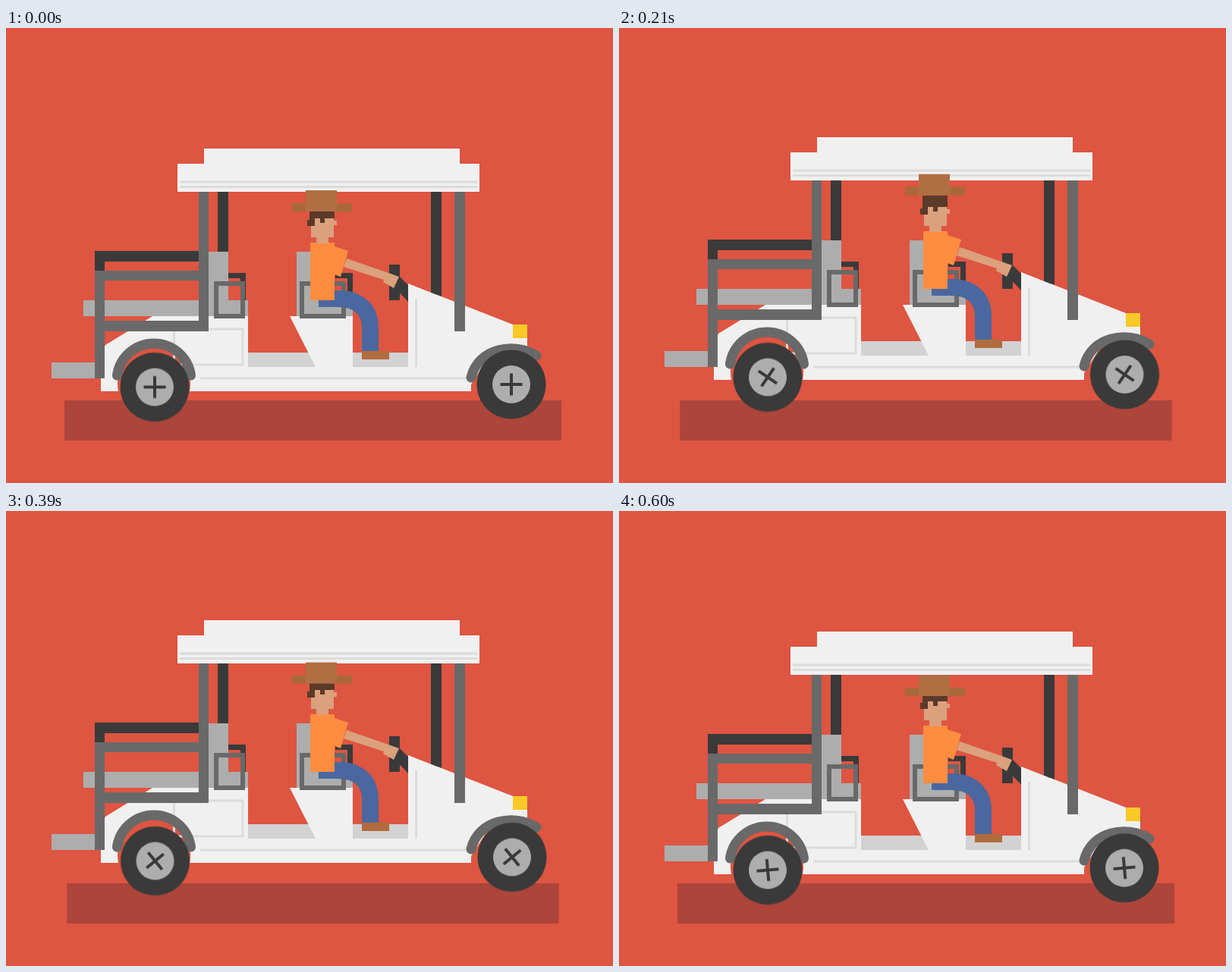
Animation of 800x600 px, one loop 0.63 s. Source, as an HTML page without scripts:

```html
<!DOCTYPE html>
<html lang="en">
<head>
<meta charset="utf-8">
<title>Bouncing cart</title>
<style>
  html, body { margin: 0; width: 100%; height: 100%; overflow: hidden; background: #de5541; }
  svg { display: block; width: 800px; height: 600px; }

  .white { fill: #f0f0f0; }
  .light { fill: #adadad; }
  .mid   { fill: #696969; }
  .dark  { fill: #3a3a3a; }
  .skin  { fill: #dba07c; }
  .hair  { fill: #5a3a29; }
  .line  { fill: none; stroke: #dcdcdc; stroke-width: 3; }
  .frame { fill: none; stroke: #696969; stroke-width: 6; }
  .back  { fill: none; stroke: #3a3a3a; stroke-width: 7; }
  .fender { fill: none; stroke: #696969; stroke-width: 13; stroke-linecap: round; }

  /* 21 poses of 30 ms, each held */
  .shadow, .cart, .hat, .rear, .front, .spokes {
    animation: 630ms -3ms infinite steps(5);
  }
  .shadow { animation-name: shrink; transform-origin: 404.5px 0; }
  .cart   { animation-name: bounce; }
  .hat    { animation-name: hat; }
  .rear   { animation-name: rear; }
  .front  { animation-name: front; }
  .spokes { animation-name: spin; animation-timing-function: steps(21); }

  @keyframes bounce {
    0%, 47.62%, 95.24%, 100% { transform: translateY(0); }
    23.81%, 71.43% { transform: translateY(-25px); }
  }
  @keyframes shrink {
    0%, 95.24%, 100% { transform: scaleX(1); }
    23.81%, 71.43% { transform: scaleX(.9847); }
    47.62% { transform: scaleX(.9969); }
  }
  @keyframes hat {
    0% { transform: translateY(0); animation-timing-function: steps(6); }
    28.57% { transform: translateY(-29.5px); animation-timing-function: steps(3); }
    42.86% { transform: translateY(-5px); animation-timing-function: steps(1); }
    47.62% { transform: translateY(0); animation-timing-function: steps(5); }
    71.43% { transform: translateY(-24px); animation-timing-function: steps(2); }
    80.95% { transform: translateY(-16px); animation-timing-function: steps(3); }
    95.24% { transform: translateY(2px); animation-timing-function: steps(1); }
    100% { transform: translateY(0); }
  }
  @keyframes rear {
    0%, 95.24%, 100% { transform: translate(0, 0); }
    14.29% { transform: translate(0, 0); animation-timing-function: steps(4); }
    33.33% { transform: translate(0, 2px); animation-timing-function: steps(2); }
    42.86% { transform: translate(.5px, 3.4px); animation-timing-function: steps(4); }
    61.9% { transform: translate(.5px, 3px); animation-timing-function: steps(4); }
    80.95% { transform: translate(-.5px, 1px); animation-timing-function: steps(3); }
  }
  @keyframes front {
    0%, 100% { transform: translate(0, 0); animation-timing-function: steps(3); }
    14.29% { transform: translate(0, .5px); animation-timing-function: steps(4); }
    33.33% { transform: translate(.5px, 2px); animation-timing-function: steps(2); }
    42.86% { transform: translate(1.3px, 2px); animation-timing-function: steps(4); }
    61.9% { transform: translate(1px, 1.5px); animation-timing-function: steps(4); }
    80.95% { transform: translate(-.5px, .2px); animation-timing-function: steps(3); }
    95.24% { transform: translate(0, .7px); animation-timing-function: steps(1); }
  }
  @keyframes spin { to { transform: rotate(372.75deg); } }
</style>
</head>
<body>
<svg viewBox="0 0 800 600">
  <defs>
    <g id="wheel">
      <circle class="dark" r="45.5"/>
      <circle class="light" r="25"/>
    </g>
    <path id="cross" d="M-14.5 0H14.5M0-14.5V14.5" stroke="#3a3a3a" stroke-width="4"/>
  </defs>

  <rect class="shadow" x="77" y="491" width="655" height="53" fill="#ac453a"/>

  <g class="cart">
    <!-- far posts and seats -->
    <path class="dark" d="M279 210h14v90h-14zM560 210h14v150h-14z"/>
    <path class="back" d="M293 326.5H312.5V360M434 326.5H453.5V360"/>
    <path class="light" d="M267 295h26v64h26v21H102v-21h165zM383 295h26v64h48v21h-74z"/>
    <path class="light" d="M60 441h60v21H60z"/>

    <!-- steering wheel -->
    <path class="dark" d="M505 312h14v47h-14z"/>
    <path class="dark" d="M518 327L531 340V362L511 341z"/>

    <!-- body -->
    <path d="M318 428H531V448H318z" fill="#d2d2d2"/>
    <path class="white" d="M193 380H319V447H408L374 380H457V447H530V337L668 391V409H687V428H640L613 470V479H242A48 48 0 1 0 148 479H125V430L131 418z"/>
    <path class="line" d="M221.500 397H312V444H221.500zM256 462H606M540.500 357V447"/>
    <rect x="668" y="391" width="19" height="18" fill="#f8c927"/>

    <path class="fender" d="M146.500 458A49 49 0 0 1 243.500 458"/>
    <path class="fender" d="M613 461C622 422 670 414 699 432"/>

    <g transform="translate(196 473.500)">
      <g class="rear"><use href="#wheel"/><g class="spokes"><use href="#cross"/></g></g>
    </g>
    <g transform="translate(666 470)">
      <g class="front"><use href="#wheel"/><g class="spokes"><use href="#cross"/></g></g>
    </g>

    <!-- near rails and posts -->
    <path class="dark" d="M117 294h137v14H130v12h-13z"/>
    <path class="mid" d="M117 320H254V210H267V400H130V462H117zM130 333V386H254V333z" fill-rule="evenodd"/>
    <path class="mid" d="M591 210h14v190h-14z"/>
    <path class="frame" d="M277 337h35v43h-35zM390 337h55v43h-55z"/>

    <!-- driver -->
    <path d="M412 357H438C465 357 480 372 480 395V427" fill="none" stroke="#4a689f" stroke-width="22"/>
    <path d="M469 426h36v11h-36z" fill="#b06c3e"/>
    <path class="skin" d="M449 304L504 323L518 328L511 343L497 335L498 332L445 315z"/>
    <path d="M401 283H433V288L451 294L441 328L433 325V359H401z" fill="#ff8d40"/>
    <path class="skin" d="M402 248H432V254H436V260H432V276H425V284H409V276H402z"/>
    <path class="hair" d="M400 236H433V251H420V257H414V251H407V261H397V253H400z"/>

    <!-- roof -->
    <path class="white" d="M261 159H598V179H624V216H226V179H261z"/>
    <path class="line" d="M229 203H621M229 209.500H621"/>
  </g>

  <g class="hat">
    <path d="M377 231h79v11h-79z" fill="#a9683b"/>
    <path d="M395 214h41v28h-41z" fill="#b06e43"/>
  </g>
</svg>
</body>
</html>
```
